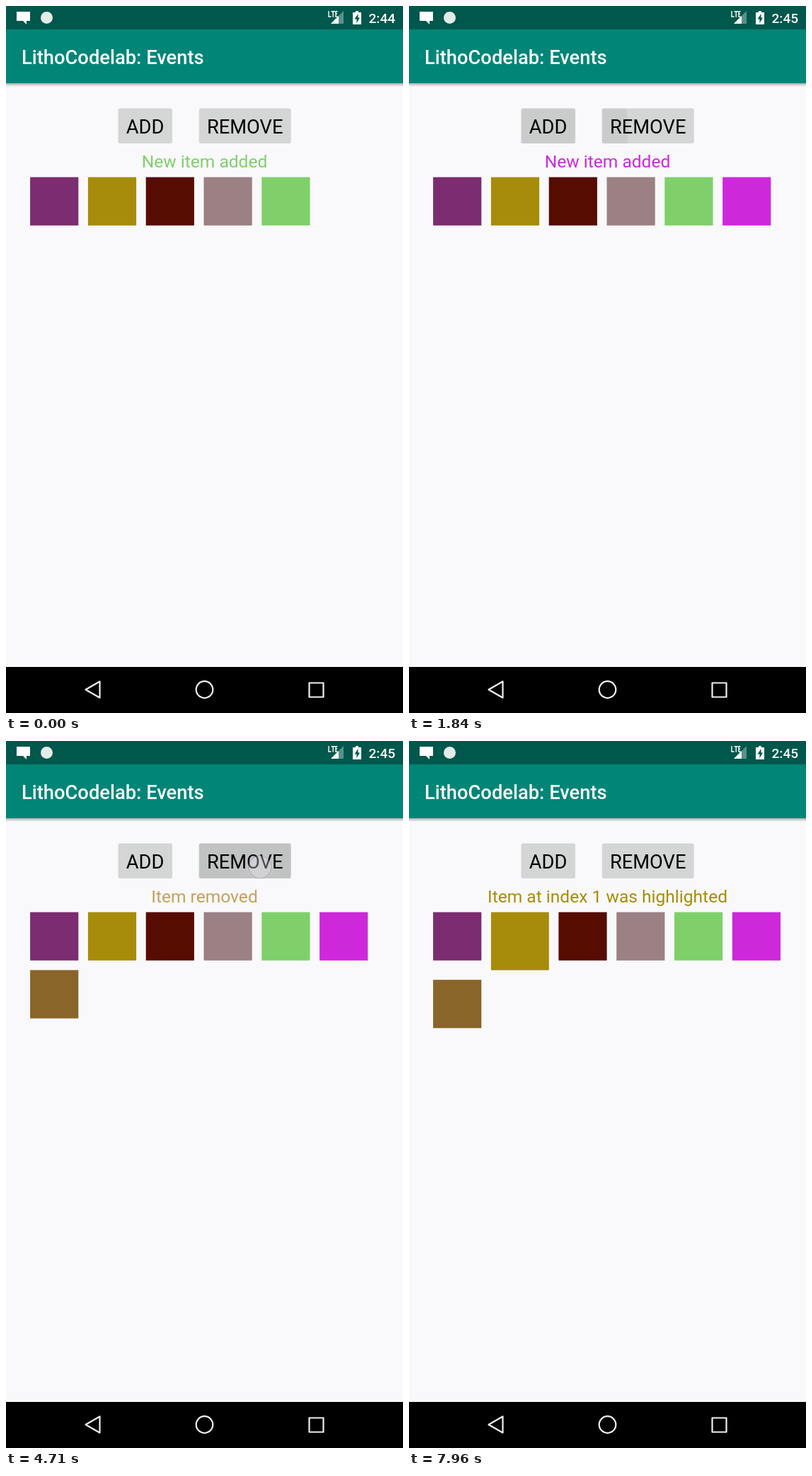
An HTML page that plays this animation: 561x998 px, repeating every 8 s.

```html
<!DOCTYPE html>
<html lang="en">
<head>
<meta charset="utf-8">
<title>LithoCodelab: Events</title>
<style>
  html, body { margin: 0; width: 100%; height: 100%; overflow: hidden; }
  svg { display: block; width: 561px; height: 998px; font-family: Roboto, sans-serif; }
  .icons { fill: none; stroke: #f0f0f0; stroke-width: 2.2; stroke-linejoin: round; }
</style>
</head>
<body>
<svg viewBox="0 0 561 998">
  <defs>
    <linearGradient id="shadow" x2="0" y2="1">
      <stop stop-color="#000" stop-opacity=".3"/>
      <stop offset="1" stop-color="#000" stop-opacity="0"/>
    </linearGradient>
    <clipPath id="buttons">
      <rect x="158.5" y="144.5" width="76.5" height="49.5" rx="2.7"/>
      <rect x="272.7" y="144.5" width="130" height="49.5" rx="2.7"/>
    </clipPath>
  </defs>

  <rect width="561" height="998" fill="#f9f9fb"/>
  <rect y="109" width="561" height="5" fill="url(#shadow)"/>
  <rect width="561" height="109" fill="#008577"/>
  <rect width="561" height="33" fill="#00574b"/>
  <text x="22" y="81.5" font-size="27.3" font-weight="500" fill="#fff">LithoCodelab: Events</text>

  <g fill="#fff">
    <path d="M15 8H34V21H29V26L24 21H15Z"/>
    <circle cx="57.5" cy="16.5" r="8.5" fill="#e4ecea"/>
    <path d="M477 7V25H459Z" opacity=".35"/>
    <path d="M470 14V25H459Z"/>
    <path d="M456 7V15H459.5M459.5 7.7H465M462.2 7.7V15.7M468.5 7.7H466V15H468.5M466 11.3H468"
      fill="none" stroke="#fff" stroke-width="1.4"/>
    <path d="M494 7H498V9H502V26H490V9H494Z"/>
    <path d="M497.5 11L492.5 18.5H495.5V24L500 16.500H497.500Z" fill="#00574b"/>
    <text id="clock" x="512.500" y="23.700" font-size="19.100" font-weight="500"></text>
  </g>

  <g clip-path="url(#buttons)">
    <rect x="150" y="140" width="260" height="60" fill="#d4d5d5"/>
    <circle id="ripple"/>
  </g>
  <g font-size="27.300" text-anchor="middle">
    <text x="196.500" y="180">ADD</text>
    <text x="337.700" y="180">REMOVE</text>
    <text id="label" x="280.500" y="228.300" font-size="24.570"></text>
  </g>
  <g id="items"></g>

  <g id="touch">
    <circle r="20" fill="#fff" opacity=".15"/>
    <circle r="16" fill="#f0eaf0" fill-opacity=".75" stroke="#8878a8" stroke-opacity=".6" stroke-width="1.500"/>
  </g>

  <rect y="933" width="561" height="65"/>
  <g class="icons">
    <path d="M112.500 965L132.500 953.500V976.500Z"/>
    <circle cx="280.500" cy="965" r="11.800"/>
    <rect x="428.500" y="955.500" width="20" height="20"/>
  </g>
</svg>
<script>
const LOOP = 8000, CLICK_DELAY = 60, CLOCK_CHANGE = 1750;
const COLORS = ['#7c2c70', '#a68c0a', '#560c00', '#9b8084', '#7fd06b',
  '#cd29db', '#8a6529', '#c4a05a', '#ec144c'];
const SIZE = 68.2, BIG = 81.9, GAP = 13.6, LEFT = 34.1, TOP = 241.6, PER_ROW = 6;
const TAPS = [
  { down: 1480, up: 1580, x: 200, y: 173, action: 'add' },
  { down: 2050, up: 2160, x: 200, y: 173, action: 'add' },
  { down: 2550, up: 2650, x: 200, y: 173, action: 'add' },
  { down: 2980, up: 3080, x: 200, y: 173, action: 'add' },
  { down: 3980, up: 4080, x: 358, y: 177, action: 'remove' },
  { down: 4480, up: 4600, x: 359, y: 178, action: 'remove' },
  { down: 5750, up: 6050, x: 304, y: 267, action: 3 },
  { down: 7560, up: 7740, x: 125, y: 285, action: 1 }
];

const byId = id => document.getElementById(id);
const [clock, ripple, label, items, touch] =
  ['clock', 'ripple', 'label', 'items', 'touch'].map(byId);
const clamp = v => Math.max(0, Math.min(1, v));
const set = (el, attrs) => {
  for (const name in attrs) el.setAttribute(name, attrs[name]);
};

const squares = COLORS.map(fill => {
  const el = document.createElementNS('http://www.w3.org/2000/svg', 'rect');
  set(el, { fill });
  return items.appendChild(el);
});

function stateAt(t) {
  const state = { count: 5, big: -1, text: 'New item added', color: COLORS[4] };
  for (const { up, action } of TAPS) {
    if (t < up + CLICK_DELAY) break;
    if (action === 'add') {
      state.color = COLORS[state.count++];
      state.text = 'New item added';
    } else if (action === 'remove') {
      state.color = COLORS[--state.count];
      state.text = 'Item removed';
    } else {
      state.big = action;
      state.color = COLORS[action];
      state.text = `Item at index ${action} was highlighted`;
    }
  }
  return state;
}

function drawItems({ count, big }) {
  let x = LEFT, y = TOP, rowHeight = 0;
  squares.forEach((el, i) => {
    if (i === PER_ROW) {
      x = LEFT;
      y += rowHeight + GAP;
    }
    const size = i === big ? BIG : SIZE;
    set(el, { x, y, width: size, height: size, visibility: i < count ? 'visible' : 'hidden' });
    x += size + GAP;
    rowHeight = Math.max(rowHeight, size);
  });
}

function drawTouch(t) {
  const tap = TAPS.filter(({ down }) => down <= t).pop();
  if (!tap) {
    set(touch, { opacity: 0 });
    set(ripple, { opacity: 0 });
    return;
  }
  const { down, up, x, y, action } = tap;
  const pressed = clamp((t - down + 30) / 110);
  const released = clamp(1 - (t - up) / 190);
  set(touch, { transform: `translate(${x} ${y})`, opacity: pressed * released });
  const onButton = typeof action === 'string';
  set(ripple, {
    cx: x, cy: y, r: 15 + 95 * clamp((t - down) / 225),
    opacity: onButton ? 0.12 * clamp(1 - (t - up) / 420) : 0
  });
}

function frame(now) {
  const t = now % LOOP, state = stateAt(t);
  clock.textContent = t < CLOCK_CHANGE ? '2:44' : '2:45';
  label.textContent = state.text;
  set(label, { fill: state.color });
  drawItems(state);
  drawTouch(t);
  requestAnimationFrame(frame);
}
frame(0);
</script>
</body>
</html>
```
